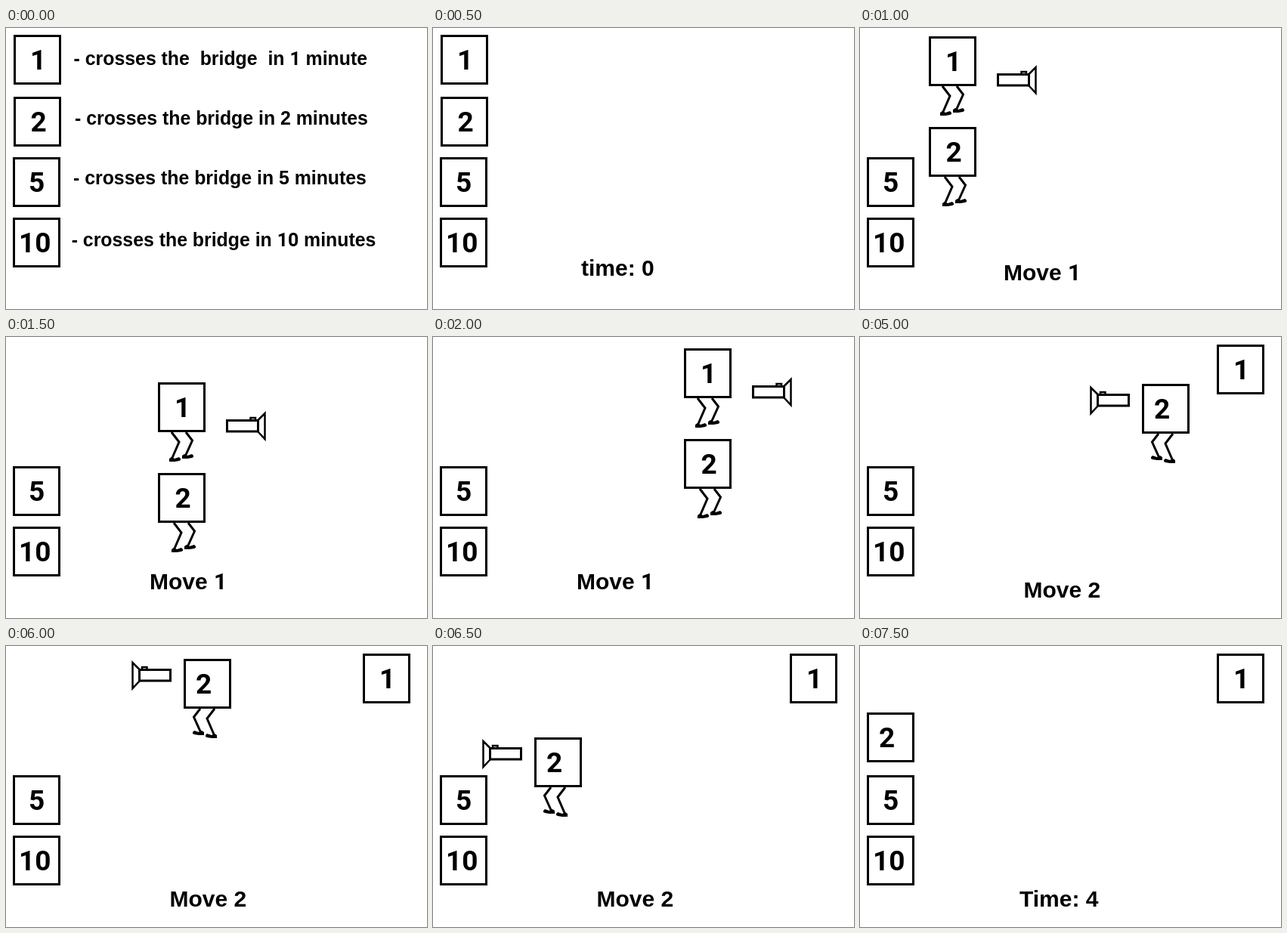
An HTML page for the animation above (8000 ms loop, 557 by 372 pixels).

```html
<!DOCTYPE html>
<html lang="en">
<head>
<meta charset="utf-8">
<title>Bridge crossing</title>
<style>
  html, body { margin: 0; width: 100%; height: 100%; overflow: hidden; background: #fff; }
  svg { display: block; width: 557px; height: 372px; }
  text { font: bold 30px "Liberation Sans", Arial, sans-serif; white-space: pre; }
  .rule { font-size: 24.85px; }
  .digit { font: bold 37px Roboto, sans-serif; text-anchor: middle; }
  .one { font-family: Roboto, sans-serif; }
  .line { fill: none; stroke: #000; stroke-width: 3; }
  .box { fill: #fff; stroke: #000; stroke-width: 3; }
</style>
</head>
<body>
<svg viewBox="0 0 557 372">
  <defs>
    <!-- Both drawn relative to the walker's box, facing right -->
    <g id="legs">
      <path class="line" d="M18 66 28 79 18.5 101M37 66 45.5 77 36.5 97"/>
      <path d="M15 101 18 99 22 101 28 99 30 101V103L28 104 22 105H15Z
               M32 97 35 95 39 97 45 95 47 97V99L45 100 39 101H32Z"/>
    </g>
    <g id="torch" class="line">
      <path d="M91.5 50.5H132.5V65H91.5Z"/>
      <path d="M132 50.5 141.5 41V75L132 65M122.5 50V47H129V50" stroke-width="2.5"/>
    </g>
  </defs>
  <g id="stage"></g>
</svg>
<script>
const stage = document.getElementById("stage");
const digitX = { 1: 32.5, 2: 33, 5: 31.5, 10: 29.3 };

const at = (x, y, body) => `<g transform="translate(${x} ${y})">${body}</g>`;

const box = (n, x, y, dx = digitX[n]) => at(x, y,
  `<rect class="box" x="1.5" y="1.5" width="60" height="63"/>
   <text class="digit" x="${dx}" y="45.5">${n}</text>`);

const label = (s, x, y, cls = "") =>
  `<text class="${cls}" x="${x}" y="${y}">${s.replace(/10?/, '<tspan class="one">$&</tspan>')}</text>`;

const rule = (s, x, y) => label("- crosses the " + s, x, y, "rule");

const waiting = box(5, 9, 171) + box(10, 9, 251);
const start = box(1, 10, 9) + box(2, 10, 91) + waiting;
const oneAcross = box(1, 472, 10);

// The pair walks right, (x, y) being the corner of box 1
const pair = (x, y) => waiting + label("Move 1", 190, 334) + at(x, y,
  box(1, 0, 0) + '<use href="#legs"/><use href="#torch"/>' +
  box(2, 0, 120) + '<use href="#legs" x="3" y="120"/>');

// Box 2 walks back left
const back = (x, y) => waiting + oneAcross + label("Move 2", 216.5, 345) + at(x, y,
  box(2, 0, 0, 26.5) +
  '<use href="#legs" transform="translate(59 0) scale(-1 1)"/>' +
  '<use href="#torch" transform="translate(74 -36) scale(-1 1)"/>');

const scenes = [
  [0, start +
    rule(" bridge  in 1 minute", 89.6, 49) +
    rule("bridge in 2 minutes", 91, 128) +
    rule("bridge in 5 minutes", 89, 207) +
    rule("bridge in 10 minutes", 86.7, 289)],
  [500, start + label("time: 0", 196, 328)],
  [1000, pair(91, 11)],
  [1500, pair(201, 60)],
  [2000, pair(332, 15)],
  [2500, pair(332, 75)],
  [3000, waiting + oneAcross + box(2, 472, 87) + label("Time: 2", 209, 328)],
  [5000, back(373, 62)],
  [5500, back(312, 184)],
  [6000, back(235, 17)],
  [6500, back(134, 121)],
  [7000, back(91, 43)],
  [7500, waiting + oneAcross + box(2, 9, 88, 26.5) + label("Time: 4", 211, 345)]
];

let shown;
function draw() {
  const t = performance.now() % 8000;
  const scene = scenes.findLast(([from]) => from <= t);
  if (scene !== shown) {
    stage.innerHTML = scene[1];
    shown = scene;
  }
  requestAnimationFrame(draw);
}
draw();
</script>
</body>
</html>
```
